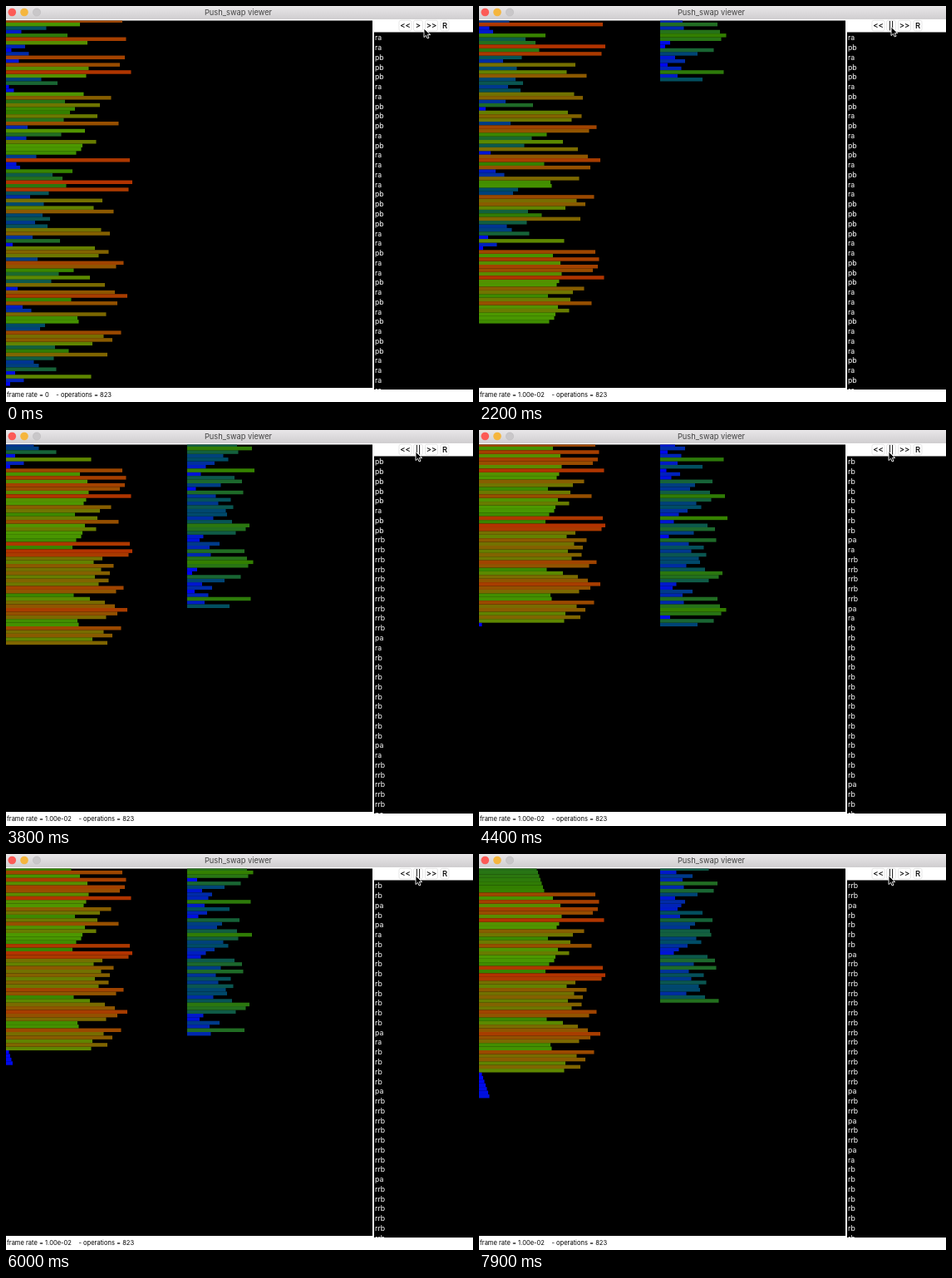
Recreate the animation shown at these times as an HTML page. Size 562x476 px, loop 8 s.

```html
<!DOCTYPE html>
<html lang="en">
<head>
<meta charset="utf-8">
<title>Push_swap viewer</title>
<style>
  html, body { margin: 0; width: 100%; height: 100%; overflow: hidden; background: #fff; }
  svg { display: block; width: 562px; height: 476px; }
  text { font-family: Inter, Roboto, "Liberation Sans", sans-serif; white-space: pre; }
  #list text { font-size: 8.7px; fill: #fff; }
  #buttons text { font-size: 9.5px; font-weight: 500; text-anchor: middle; fill: #000; }
  #buttons rect { fill: #fff; stroke: #dcdcdc; stroke-width: .7; }
</style>
</head>
<body>
<svg viewBox="0 0 562 476">
  <defs>
    <linearGradient id="bar" x2="0" y2="1">
      <stop offset="0" stop-color="#e9e7e9"/>
      <stop offset="1" stop-color="#d1cfd1"/>
    </linearGradient>
    <clipPath id="stackClip"><rect y="17.5" width="441" height="441.5"/></clipPath>
    <clipPath id="listClip"><rect x="443" y="31.5" width="119" height="429.5"/></clipPath>
  </defs>
  <rect width="562" height="476" fill="#fff"/>
  <rect width="562" height="15" fill="url(#bar)"/>
  <rect y="15" width="562" height=".7" fill="#bdbbbd"/>
  <circle cx="7.3" cy="7.5" r="4.8" fill="#fc5b57"/>
  <circle cx="22" cy="7.5" r="4.8" fill="#f5b63e"/>
  <circle cx="37" cy="7.5" r="4.6" fill="#c9c7c9" stroke="#b9b7b9" stroke-width=".5"/>
  <text x="279.5" y="11" font-size="9.3" text-anchor="middle" fill="#444">Push_swap viewer</text>

  <rect y="17.5" width="441" height="441.5"/>
  <rect x="443" y="31.5" width="119" height="429.5"/>
  <g id="bars" clip-path="url(#stackClip)"></g>
  <g id="list" clip-path="url(#listClip)"></g>
  <g id="buttons"></g>
  <text id="status" x="1" y="470.3" font-size="7.55" fill="#000"></text>
  <path id="cursor" d="M0 0V10.6L2.5 8.3L4.2 12L6 11.2L4.4 7.6H7.8Z" fill="#000" stroke="#fff" stroke-width=".9"/>
</svg>
<script>
const NS = "http://www.w3.org/2000/svg";
const LOOP = 8000, STEP = 100, PLAY_AT = 900;
const ROW = 4.41, TOP = 15.5, LEFT_A = -2.5, LEFT_B = 218;
const LINES = 37, LINE = 11.76;
const START = [
  92, 58, 31, 11, 48, 95, 64, 14, 3, 17, 94, 9, 90, 65, 99, 63, 27, 40, 1, 5,
  61, 83, 46, 74, 54, 50, 72, 45, 89, 16, 62, 43, 15, 71, 60, 59, 55, 23, 98, 7,
  10, 52, 36, 44, 100, 47, 97, 33, 18, 76, 29, 69, 85, 28, 34, 22, 32, 75, 82, 20,
  42, 4, 70, 81, 73, 24, 93, 87, 53, 41, 66, 35, 78, 8, 86, 96, 51, 88, 12, 19,
  79, 56, 57, 30, 26, 91, 77, 84, 68, 38, 49, 80, 37, 21, 25, 39, 6, 67, 13, 2];
const MEDIAN = 51;
// [time, operations done]
const PACE = [[1000, 0], [1600, 17], [2900, 62], [3800, 93], [5200, 143], [6800, 200], [7900, 237], [8000, 240]];
// [time, x, y]
const PATH = [[0, 503, 27], [300, 496, 25], [2600, 496, 25], [2900, 493, 26]];

const byId = id => document.getElementById(id);

function add(parent, tag, attrs) {
  const el = document.createElementNS(NS, tag);
  for (const k in attrs) el.setAttribute(k, attrs[k]);
  return parent.appendChild(el);
}

function along(keys, t, col) {
  if (t <= keys[0][0]) return keys[0][col];
  for (let i = 1; i < keys.length; i++) {
    const p = keys[i - 1], q = keys[i];
    if (t <= q[0]) return p[col] + (q[col] - p[col]) * (t - p[0]) / (q[0] - p[0]);
  }
  return keys[keys.length - 1][col];
}

const MOVES = {
  ra: (a, b) => a.push(a.shift()),
  rb: (a, b) => b.push(b.shift()),
  rrb: (a, b) => b.unshift(b.pop()),
  pa: (a, b) => a.unshift(b.shift()),
  pb: (a, b) => b.unshift(a.shift())
};

// Lower half goes to b; then the nearer of b's extremes returns to a.
function solve() {
  const a = START.slice(), b = [], ops = [];
  const run = (op, times = 1) => {
    for (; times > 0; times--) { MOVES[op](a, b); ops.push(op); }
  };
  START.forEach(v => run(v <= MEDIAN ? "pb" : "ra"));
  const cost = i => Math.min(i, b.length - i);
  while (b.length) {
    const lo = b.indexOf(Math.min(...b)), hi = b.indexOf(Math.max(...b));
    const low = cost(lo) < cost(hi), i = low ? lo : hi;
    if (i <= b.length / 2) run("rb", i);
    else run("rrb", b.length - i);
    run("pa");
    if (low) run("ra");
  }
  return ops;
}

function color(v) {
  const k = v / 100;
  const r = 255 * Math.max(0, k - .3);
  const g = 255 * k - 510 * Math.max(0, k - .6);
  const b = Math.max(0, 255 - 510 * k);
  return `rgb(${r | 0},${g | 0},${b | 0})`;
}

const ops = solve();
const bars = [];
for (let v = 1; v <= 100; v++) {
  bars[v] = add(byId("bars"), "rect", { width: 1.5 * v + 4.5, height: ROW + .05, fill: color(v) });
}
const lines = Array.from({ length: LINES }, (_, i) =>
  add(byId("list"), "text", { x: 444, y: 41.3 + i * LINE }));

const labels = [["<<", 480.5, 15], [">", 496, 11], [">>", 512, 15], ["R", 528, 10]].map(([s, x, w]) => {
  add(byId("buttons"), "rect", { x: x - w / 2, y: 17.3, width: w, height: 12.6, rx: 2 });
  const el = add(byId("buttons"), "text", { x, y: 27 });
  el.textContent = s;
  return el;
});

function place(stack, left) {
  stack.forEach((v, i) => {
    bars[v].setAttribute("x", left);
    bars[v].setAttribute("y", (TOP + i * ROW).toFixed(2));
  });
}

function draw(time) {
  const t = Math.floor(time / STEP) * STEP;
  const done = Math.floor(along(PACE, t, 1) + 1e-6);
  const a = START.slice(), b = [];
  for (let i = 0; i < done; i++) MOVES[ops[i]](a, b);
  place(a, LEFT_A);
  place(b, LEFT_B);
  const first = Math.max(0, done - 1);
  lines.forEach((el, i) => { el.textContent = ops[first + i] || ""; });
  const playing = t >= PLAY_AT;
  labels[1].textContent = playing ? "||" : ">";
  byId("status").textContent = `frame rate = ${playing ? "1.00e-02" : "0"}    - operations = 823`;
  byId("cursor").setAttribute("transform", `translate(${along(PATH, t, 1)} ${along(PATH, t, 2)})`);
}

const began = performance.now();
function tick() {
  draw((performance.now() - began) % LOOP);
  requestAnimationFrame(tick);
}
tick();
</script>
</body>
</html>
```
